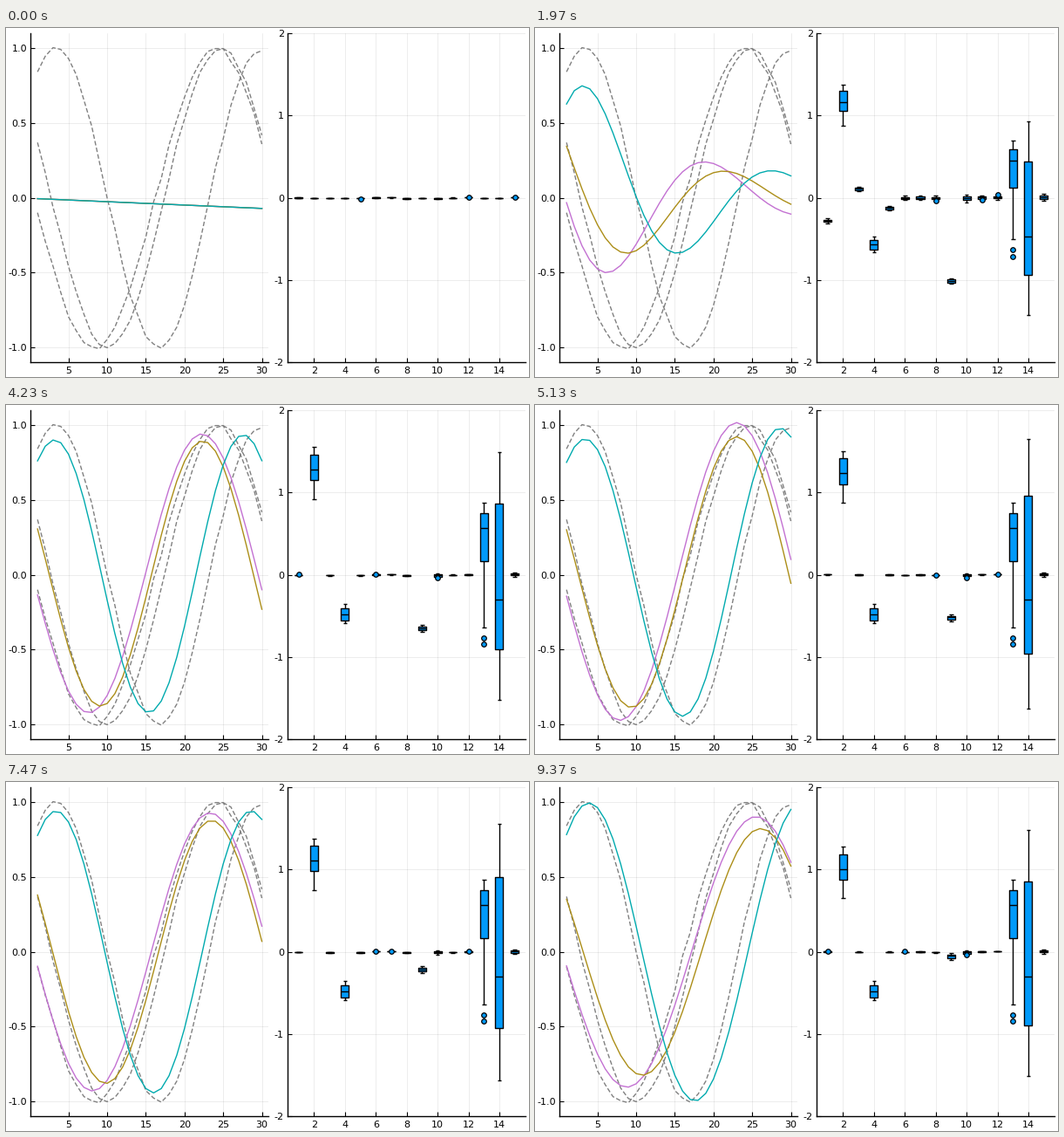
Write a matplotlib script that moves like this. It is 600 px wide and 400 px high and loops after 9410 ms.

```python
import numpy as np
import matplotlib.pyplot as plt
from matplotlib.animation import FuncAnimation
from matplotlib.collections import LineCollection, PolyCollection

plt.rcParams.update({"font.family": "DejaVu Sans", "font.size": 8,
                     "axes.unicode_minus": False})

FRAMES, LOOP = 282, 9410
BLUE = "#009afa"
COLORS = ["#c371d2", "#ac8e18", "#00aaae"]
X = np.arange(1, 31)
rng = np.random.default_rng(4)

# Noisy waves to be learned: angular speed and position of a peak.
WAVES = [(.2, 24.1), (.215, 24.7), (.238, 3.45)]
targets = [np.cos(w * (X - p)) + rng.normal(0, .01, 30) for w, p in WAVES]

# Fitted waves over time: first turn, second turn and height of the first.
TIMES = [59, 99, 153, 193, 223, 280]
FITS = [
    [(6.2, 18.8, -.50), (7.4, 21.5, -.865), (7.9, 23.0, -.973),
     (8.7, 24.9, -.96), (8.1, 23.3, -.93), (8.8, 25.5, -.905)],
    [(8.8, 21.3, -.37), (8.9, 21.7, -.83), (9.4, 23.0, -.887),
     (10.1, 24.6, -.925), (9.8, 23.5, -.88), (10.8, 26.1, -.825)],
    [(3.1, 15.3, .75), (3.0, 14.8, .86), (3.4, 16.0, .91),
     (3.6, 16.7, .962), (3.4, 16.0, .943), (3.9, 17.6, .997)],
]

# Box shapes around the median: low, q1, median, q3, high.
SHAPES = {2: [-.36, -.13, 0, .18, .27], 4: [-.11, -.07, 0, .07, .13],
          9: [-.045, -.025, 0, .02, .04], 13: [-1.21, -.41, 0, .175, .305],
          14: [-1.36, -.67, 0, 1.3, 2.0]}
EARLY = {1: -.285, 3: .11, 5: -.125}   # weights that fade away again
WIDE = (10, 15)
phases = rng.uniform(0, 2 * np.pi, 16)
small = [j for j in range(1, 16) if j not in SHAPES]
stray = [rng.choice(small, 3, replace=False) for _ in range(FRAMES // 25 + 1)]


def unrest(n):
    """Training jitter between the settled times, 0 to 1."""
    if not TIMES[0] < n < TIMES[-1]:
        return 0
    return abs(np.sin(np.pi * np.interp(n, TIMES, range(len(TIMES)))))


def wave(n, fit, phase):
    """Damped cosine through its first two turns."""
    first, second, height = (np.interp(n, TIMES, col) for col in zip(*fit))
    w = np.pi / (second - first)
    g = np.interp(n, [59, 99, 170, 223], [-.058, 0, .004, 0])
    a = np.arctan(g / w)
    y = height * np.exp(g * (X - first)) * np.cos(w * (X - first) + a) / np.cos(a)
    y *= 1 + .025 * unrest(n) * np.sin(.45 * n + phase)
    grow = min(1, n / TIMES[0])
    return grow * y + (1 - grow) * (-.005 - .00225 * (X - 1))


def box_stats(n):
    """Five-number rows of all 15 boxes."""
    grow = min(1, n / 75)
    fade = np.interp(n, [0, 59, 99], [0, 1, 0])
    left_over = max(0, (280 - n) / 221)
    overshoot = .75 * np.exp(-((n - 24) / 9) ** 2)
    median = {2: np.interp(n, [0, 59, 99, 280], [0, 1.165, 1.33, 1.01]),
              4: np.interp(n, [0, 59, 99], [0, -.57, -.48]),
              9: -min(1, n / 59) * (.05 + .96 * min(1, left_over) ** 1.3),
              13: .575 * grow,
              14: np.interp(n, [0, 59, 99], [0, -.47, -.3])}
    scale = {13: grow,
             14: (np.interp(n, [0, 59, 99, 280], [0, .7, 1.01, .89]) + overshoot)
             * (1 + .14 * unrest(n) * np.sin(.38 * n))}
    rows = []
    for j in range(1, 16):
        if j in SHAPES:
            shape = np.array(SHAPES[j]) * scale.get(j, grow)
            rows.append(median[j] + shape)
        else:
            mid = EARLY.get(j, 0) * fade + .007 * np.sin(.2 * n + phases[j])
            spread = .002 + .012 * fade + .011 * grow * (j in WIDE)
            rows.append(mid + spread * np.arange(-2, 3))
    return rows


def outlier_points(n, rows):
    dots = []
    for j in stray[n // 25]:
        row = rows[j - 1]
        side = 1 if phases[j] < np.pi else -1
        dots.append((j, row[2] + side * 1.2 * (row[4] - row[2])))
    if n > 8:
        dots += [(13, rows[12][0] - .13), (13, rows[12][0] - .21)]
    return dots


fig = plt.figure(figsize=(6, 4), dpi=100, facecolor="white")


def panel(x0, xlim, ylim, xticks, yticks, labels):
    ax = fig.add_axes([x0 / 600, 16.76 / 400, 272.8 / 600, 377 / 400])
    ax.set(xlim=xlim, ylim=ylim, xticks=xticks)
    ax.set_yticks(yticks, labels)
    ax.grid(color="black", alpha=.1, lw=.5)
    ax.set_axisbelow(True)
    ax.spines[["top", "right"]].set_visible(False)
    ax.spines[["left", "bottom"]].set_linewidth(1)
    ax.tick_params(direction="in", length=3.6, width=.8)
    ax.tick_params(axis="x", pad=3.6)
    ax.tick_params(axis="y", pad=3.2)
    return ax


left = panel(28.45, (.13, 30.87), (-1.1, 1.1), range(5, 31, 5),
             [-1, -.5, 0, .5, 1], ["-1.0", "-0.5", "0.0", "0.5", "1.0"])
right = panel(323.3, (.297, 15.703), (-2, 2), range(2, 15, 2),
              range(-2, 3), ["-2", "-1", "0", "1", "2"])

for y in targets:
    left.plot(X, y, color="gray", lw=1, ls=(0, (3.7, 1.9)))
lines = [left.plot(X, 0 * X, color=c, lw=1)[0] for c in COLORS]

whiskers = LineCollection([], colors="black", linewidths=1, zorder=3)
boxes = PolyCollection([], facecolors=BLUE, edgecolors="black",
                       linewidths=1, zorder=4)
medians = LineCollection([], colors="black", linewidths=1, zorder=5)
for group in (whiskers, boxes, medians):
    right.add_collection(group, autolim=False)
outliers, = right.plot([], [], "o", ms=4, mfc=BLUE, mec="black", mew=.9, zorder=6)

HALF, CAP = .256, .133


def update(n):
    for i, line in enumerate(lines):
        line.set_ydata(wave(n, FITS[i], i))
    rows = box_stats(n)
    stems, rects, meds = [], [], []
    for x, (lo, q1, med, q3, hi) in enumerate(rows, 1):
        stems += [[(x, lo), (x, q1)], [(x, q3), (x, hi)],
                  [(x - CAP, lo), (x + CAP, lo)], [(x - CAP, hi), (x + CAP, hi)]]
        l, r = x - HALF, x + HALF
        rects.append([(l, q1), (r, q1), (r, q3), (l, q3)])
        meds.append([(l, med), (r, med)])
    whiskers.set_segments(stems)
    boxes.set_verts(rects)
    medians.set_segments(meds)
    outliers.set_data(*zip(*outlier_points(n, rows)))
    return [*lines, whiskers, boxes, medians, outliers]


ani = FuncAnimation(fig, update, frames=FRAMES, interval=LOOP / FRAMES,
                    init_func=lambda: update(0), repeat=True, repeat_delay=0)
plt.show()
```
